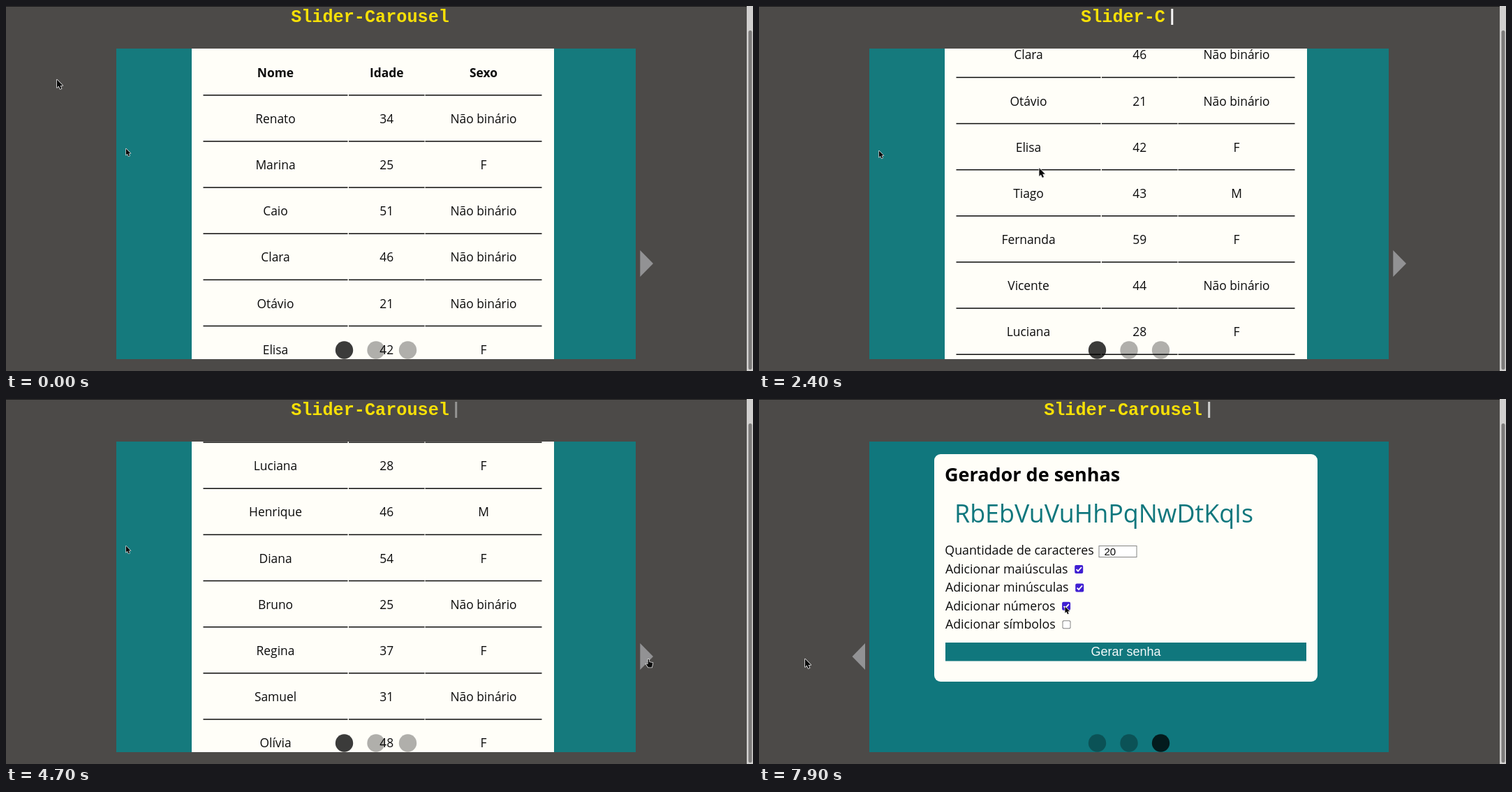
An HTML page with a canvas that plays this animation: 1070x523 px, repeating every 8 s.

```html
<!DOCTYPE html>
<html lang="pt">
<head>
<meta charset="utf-8">
<title>Slider-Carousel</title>
<style>
html, body { margin: 0; width: 100%; height: 100%; overflow: hidden; background: #4c4a48; }
canvas { display: block; width: 1070px; height: 523px; }
</style>
</head>
<body>
<canvas id="stage" width="1070" height="523"></canvas>
<script>
const ctx = document.getElementById('stage').getContext('2d');
const LOOP = 8000;
const VIEW = { x: 158, y: 61, w: 744, h: 445 };
const MID = 367.5;
const SANS = '"Open Sans", "Noto Sans", sans-serif';
const BUTTON = '"Liberation Sans", Arial, sans-serif';
const CREAM = '#fffef8', TEAL = '#10777d', INK = '#0c0c0c', GREY = '#929294';

const people = `Nome 34 Sexo`.split(' ').length && [
  'Renato 34 N', 'Marina 25 F', 'Caio 51 N', 'Clara 46 N', 'Otávio 21 N', 'Elisa 42 F',
  'Tiago 43 M', 'Fernanda 59 F', 'Vicente 44 N', 'Luciana 28 F', 'Henrique 46 M',
  'Diana 54 F', 'Bruno 25 N', 'Regina 37 F', 'Samuel 31 N', 'Olívia 48 F', 'Murilo 29 M'
];
const rows = ['Nome Idade Sexo', ...people].map(line =>
  line.split(' ').map(cell => cell === 'N' ? 'Não binário' : cell));

const clicks = [5122, 6180];
const reloads = [400, 1900, 3200];

const clamp = v => Math.min(1, Math.max(0, v));
const progress = (t, start, length) => clamp((t - start) / length);

// Straight moves through points given as [time, x, y].
function path(t, points) {
  let [, x, y] = points[0];
  for (let i = 1; i < points.length; i++) {
    const [start, x0, y0 = 0] = points[i - 1];
    const [end, x1, y1 = 0] = points[i];
    const p = progress(t, start, end - start);
    if (p > 0) {
      x = x0 + (x1 - x0) * p;
      y = y0 + (y1 - y0) * p;
    }
  }
  return [x, y];
}

function rect(x, y, w, h, color) {
  ctx.fillStyle = color;
  ctx.fillRect(x, y, w, h);
}

function round(x, y, w, h, r, color) {
  ctx.fillStyle = color;
  ctx.beginPath();
  ctx.roundRect(x, y, w, h, r);
  ctx.fill();
}

function trace(points) {
  ctx.beginPath();
  points.forEach(([x, y]) => ctx.lineTo(x, y));
}

function poly(points, color) {
  trace(points);
  ctx.fillStyle = color;
  ctx.fill();
}

function text(str, x, y, font, color = INK, align = 'left') {
  ctx.font = font;
  ctx.fillStyle = color;
  ctx.textAlign = align;
  ctx.fillText(str, x, y);
}

function outlined(x, y, scale, points) {
  ctx.save();
  ctx.translate(x, y);
  ctx.scale(scale, scale);
  ctx.lineWidth = 1.6;
  ctx.lineJoin = 'round';
  ctx.strokeStyle = '#e8e8e8';
  trace(points);
  ctx.closePath();
  ctx.stroke();
  ctx.fillStyle = '#0a0a0a';
  ctx.fill();
  ctx.restore();
}

function arrow([x, y], scale = 1) {
  outlined(x, y, scale, [[0.5, 0.5], [0.5, 12], [3, 9.6], [5, 14], [7, 13.2], [5.2, 9], [8.8, 9]]);
}

function hand([x, y]) {
  outlined(x, y, 1, [[1, 1], [2.5, 1], [3, 5], [8, 6], [6.6, 12.5], [1.5, 12.5], [-2, 7.6], [1, 8]]);
}

function button(label, x, y, w, color = TEAL) {
  rect(x, y, w, 26.5, color);
  text(label, MID, y + 19.3, `18px ${BUTTON}`, '#f4fafa', 'center');
}

function drawTable(t) {
  rect(0, VIEW.y, VIEW.w + 0.5, VIEW.h, '#157a7d');
  rect(108, VIEW.y, 519, VIEW.h, CREAM);
  const [scroll] = path(t, [[0, 0], [1800, 203.2], [2900, 362.3], [3800, 462.5], [4700, 661]]);
  const columns = [[124.5, 207], [333, 108.5], [442.5, 167]];
  rows.forEach((row, i) => {
    const line = 127.8 + 66.15 * i - scroll;
    const font = `${i ? 'normal' : 'bold'} 17.4px ${SANS}`;
    columns.forEach(([x, w], k) => {
      text(row[k], x + w / 2, line - 26, font, INK, 'center');
      rect(x, line - 0.8, w, 1.5, INK);
    });
  });
  arrow([13.5, 204 + t / 760], 0.8);
}

function drawNumberCard(t) {
  rect(0, VIEW.y, VIEW.w + 0.5, VIEW.h, TEAL);
  round(205, 92, 325, 194.5, 9, CREAM);
  text('Gerador de CPFs', MID, 157, `bold 33.8px ${SANS}`, '#000', 'center');
  text('714.773.750-00', MID, 191.5, `bold 25.5px ${SANS}`, '#14756f', 'center');
  button('Gerar Novo', 218, 210, 299);
  rect(0, 496.5, VIEW.w, 9.5, '#000');
  if (t < clicks[1]) {
    rect(0, 496.5, VIEW.w, 4, '#6b590f');
    for (let x = 67; x < 400; x += 97) rect(x, 497, 3, 2, '#e8e4d0');
  } else {
    for (let x = 516; x < 610; x += 26) {
      poly([[x + 6, 496.5], [x + 26, 496.5], [x + 20, 500], [x, 500]], '#0d5a5e');
    }
  }
  arrow([153, 235], 0.8);
}

function checkbox(x, y, on) {
  round(x - 6, y - 6, 12, 12, 2, on ? '#3f1fd2' : '#858585');
  if (!on) {
    round(x - 5, y - 5, 10, 10, 1.5, '#fff');
    return;
  }
  ctx.strokeStyle = '#fff';
  ctx.lineWidth = 1.8;
  trace([[x - 3.6, y + 0.2], [x - 1.2, y + 2.7], [x + 3.8, y - 3]]);
  ctx.stroke();
}

function drawForm(t) {
  rect(0, VIEW.y, VIEW.w, VIEW.h, TEAL);
  round(93, 79, 549, 326, 9, CREAM);
  text('Gerador de senhas', 108, 118, `bold 27px ${SANS}`, '#000');
  const password = t < 7200 ? 'MVDDWWSJYJTLTHIFQXKB' : 'RbEbVuVuHhPqNwDtKqIs';
  text(password, 122, 177, `35.8px ${SANS}`, TEAL);

  const font = `17.8px ${SANS}`;
  text('Quantidade de caracteres', 108.3, 223.3, font);
  rect(328.5, 210, 55, 17, '#858585');
  rect(329.5, 211, 53, 15, '#fff');
  text('20', 336.5, 223.5, `15px ${BUTTON}`);

  const checkedAt = { 'maiúsculas': 0, 'minúsculas': 6600, 'números': 7800, 'símbolos': LOOP };
  Object.entries(checkedAt).forEach(([name, time], i) => {
    const label = 'Adicionar ' + name, y = 244 + 26.4 * i;
    text(label, 108.9, y + 5.8, font);
    checkbox(124.6 + ctx.measureText(label).width, y, t >= time);
  });

  const hovered = t >= 7000 && t < 7500;
  button('Gerar senha', 109, 349, 517, hovered ? '#0c6166' : TEAL);
  arrow(path(t, [[6500, 298, 275], [7000, MID, 363], [7300, MID, 363], [7700, 280, 297]]), 0.8);
}

function drawSlides(t) {
  const moved = clicks.reduce((sum, c) => sum + progress(t, c, 320), 0);
  ctx.save();
  ctx.beginPath();
  ctx.rect(VIEW.x, VIEW.y, VIEW.w, VIEW.h);
  ctx.clip();
  [drawTable, drawNumberCard, drawForm].forEach((drawSlide, i) => {
    if (Math.abs(i - moved) >= 1) return;
    ctx.save();
    ctx.translate(VIEW.x + (i - moved) * VIEW.w, 0);
    drawSlide(t);
    ctx.restore();
  });
  ctx.restore();
}

function drawControls(page) {
  for (let i = 0; i < 3; i++) {
    ctx.fillStyle = `rgba(0,0,0,${i === page ? 0.77 : 0.31})`;
    ctx.beginPath();
    ctx.arc(484.5 + 45.5 * i, 493, 12.7, 0, Math.PI * 2);
    ctx.fill();
  }
  const triangle = (x, tip) => poly([[x, 350], [tip, 369], [x, 388]], GREY);
  if (page > 0) triangle(152, 133.5);
  if (page < 2) triangle(908.3, 927);
}

function drawTitle(t) {
  const full = 'Slider-Carousel';
  const start = reloads.filter(r => r <= t).pop() ?? -LOOP;
  const shown = full.slice(0, Math.floor((t - start) / 60));
  text(shown, 521.5, 22.5, 'bold 25.2px "Liberation Mono", monospace', '#f7e007', 'center');
  ctx.globalAlpha = Math.abs(Math.sin(Math.PI * t / 1500));
  rect(529.8 + shown.length * 7.56, 4, 3, 23, '#fff');
  ctx.globalAlpha = 1;
}

function drawBrowser(t) {
  rect(0, 0, 1061, 1, '#1c1b1b');
  rect(1061, 0, 9, 523, '#d0cfce');
  round(1063.5, 35, 5, 486, 2.5, '#7c7b7a');
  if (reloads.some(r => t >= r - 200 && t < r)) {
    round(-4, 506.5, 256.5, 20, 3, '#5a5a5a');
    round(-4, 507.5, 255.5, 20, 3, '#2c2d2e');
    text('127.0.0.1', 2.5, 520.3, `11px ${SANS}`, '#f0f0f0');
  }
}

function drawPointer(t) {
  const spot = path(t, [[2050, 72.5, 105], [2900, 870, 413], [3300, 1004, 392], [3800, 957, 368],
    [4300, 918.5, 372], [7100, 918.5, 372], [7800, 36, 371], [7900, 65.5, 372]]);
  if (t >= 4300 && t < clicks[1]) hand(spot);
  else arrow(spot);
}

function draw(t) {
  rect(0, 0, 1070, 523, '#4c4a48');
  drawSlides(t);
  drawControls(clicks.filter(c => c <= t).length);
  drawTitle(t);
  drawBrowser(t);
  drawPointer(t);
}

// The picture advances in 100 ms steps.
const began = performance.now();
function tick() {
  const ms = Math.max(0, performance.now() - began) % LOOP;
  draw(Math.floor(ms / 100 + 1e-6) * 100);
  requestAnimationFrame(tick);
}
tick();
</script>
</body>
</html>
```
